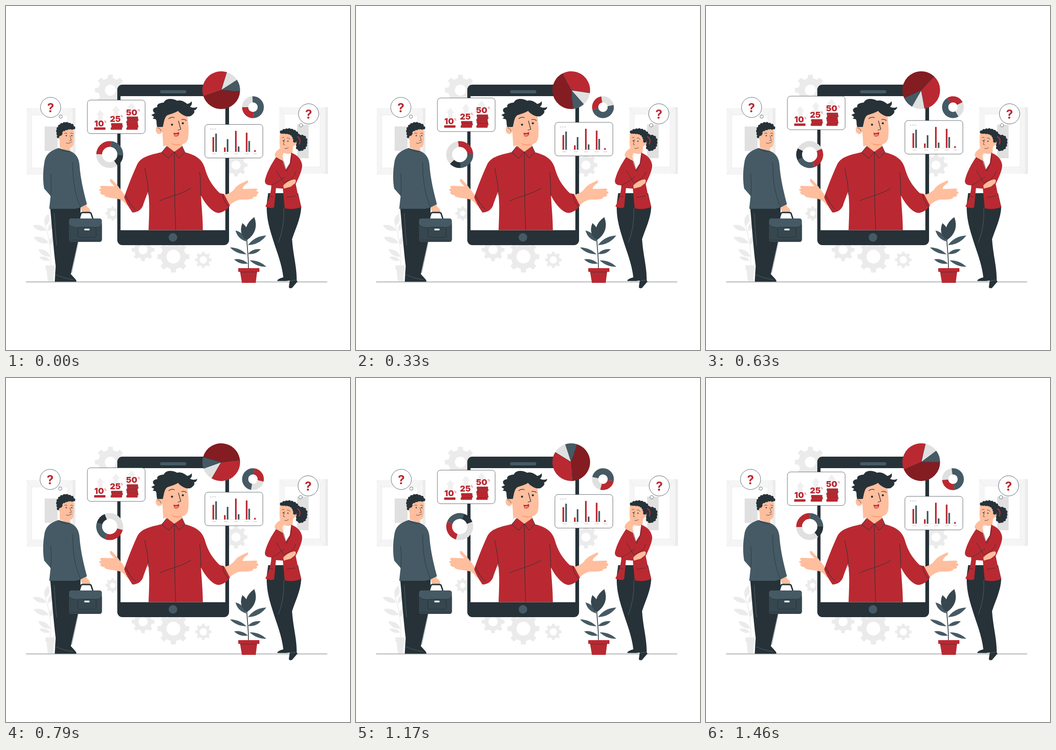
These frames come from a looping animation (748x748 px, 1.5 s). An HTML page:

```html
<!DOCTYPE html>
<html lang="en">
<head>
<meta charset="utf-8">
<style>
  html, body { margin: 0; width: 100%; height: 100%; overflow: hidden; background: #fff; }
  svg { display: block; width: 100vw; height: 100vh; }
  text { font-family: Inter, "Open Sans", sans-serif; fill: #ba2931; }
  .red { fill: #ba2931; } .dark { fill: #263238; } .slate { fill: #455a64; } .deep { fill: #37474f; }
  .pale { fill: #ebebeb; } .grey { fill: #e0e0e0; } .skin { fill: #ffbe9d; } .white { fill: #fff; }
  .line { fill: none; stroke: #263238; stroke-linecap: round; stroke-linejoin: round; }
  .seam { fill: none; stroke: #607580; stroke-width: .7; }
  .curls { stroke: #263238; stroke-width: 7; stroke-linecap: round; stroke-dasharray: 0 6; }
  .panel { fill: #fff; stroke: #263238; stroke-width: .7; }
  .big { font-weight: 900; font-size: 18px; }
  .small { font-size: 6px; }
  .ask { font-weight: 700; font-size: 27px; text-anchor: middle; }
</style>
</head>
<body>
<svg viewBox="0 0 748 748">
  <defs>
    <g id="frame">
      <path fill="#f5f5f5" d="M0 0H106V145H0Z"/>
      <path class="pale" d="M100 0H106V145H100Z"/>
      <path class="white" d="M11 15H89V130H11Z"/>
      <path fill="none" stroke="#e6e6e6" stroke-width=".7" d="M0 0L11 15H89V130H11V15M100 0L89 15M0 145L11 130M100 145L89 130"/>
    </g>
    <g id="bubble" class="panel"><circle r="22"/><circle cx="22" cy="20" r="3.6"/></g>
    <path id="arrow" fill="#f0f0f0" d="M0 0L9 11H5V24H-5V11H-9Z"/>
  </defs>

  <use href="#frame" x="45" y="222"/><path class="grey" d="M84 262H112V315H84Z"/>
  <use href="#frame" x="594" y="220"/><path class="grey" d="M633 258H658V331H633Z"/>
  <g id="gears" class="pale"></g>
  <g id="ghost" class="pale">
    <path d="M86 564H106V573H104L103 599H91L88 573H86Z"/>
    <path fill="none" stroke="#ebebeb" stroke-width="1.5" d="M97 565C100 535 92 495 85 475"/>
  </g>
  <path class="line" stroke-width=".7" d="M44 600H698"/>

  <!-- tablet -->
  <rect class="dark" x="242" y="171" width="243" height="349" rx="11"/>
  <path class="white" d="M249 196H477V487.500H249Z"/>
  <rect class="slate" x="335" y="183" width="57" height="7" rx="3.500"/>
  <circle class="slate" cx="363" cy="503" r="9.300"/>

  <!-- presenter -->
  <g>
    <path class="skin" d="M280 438L258 411C250 400 240 386 230 377C226 374 224 379 229 385L236 392L208 391C203 392 204 395 208 397C201 398 200 401 207 403C203 406 205 411 214 411C214 417 230 417 240 419C250 420 256 424 262 433Z"/>
    <path class="skin" d="M472 411C488 408 494 402 498 396C506 387 516 384 523 380C527 378 528 382 524 386C518 390 514 394 515 398L542 397C548 397 548 401 543 402C551 403 550 408 545 409C548 414 542 415 538 415C538 422 520 421 510 421C502 421 492 428 483 436Z"/>
    <path class="red" d="M350 305L338 318C312 324 293 328 285 345C275 367 265 392 257 416C262 430 270 442 275 449C287 449 297 441 299 430L309 403C313 430 311 460 310 487.500H428C428 460 425 435 424 412C434 432 450 450 463 450C474 448 482 441 487 434L474 409L465 407C450 393 440 377 434 358C429 338 420 326 389 318L383 305Z"/>
    <path class="skin" d="M338 240L342 306L348 303L366 317L384 304L383 301C392 299 396 292 396.500 283C398 268 396 252 394 236L378 222L350 224Z"/>
    <path fill="#ff9a6c" d="M358 298C367 301 376 302 384 300C377 304 366 305 358 298Z"/>
    <ellipse class="skin" cx="333" cy="269" rx="7.500" ry="9.500"/>
    <path class="dark" d="M341 263L329 263C326 256 329 249 325 246L319 245L322 241L316 237L324 233C317 229 318 221 329 220C327 213 334 211 343 210C347 200 362 200 372 206C380 203 390 209 394 213C399 212 402 210 403 207C406 212 403 217 400 219C406 222 412 222 416 219C415 225 411 227 408 227C412 229 409 235 400 240L393 240C386 238 379 234 374 228C369 232 358 235 352 237C345 240 344 250 341 263Z"/>
    <path class="line" stroke-width="1.300" d="M354 245Q360 240 366 243M382 247Q388 245 392 249M375 250L380 268L374 270"/>
    <path class="line" stroke-width=".8" d="M330 265Q335 265 337 272"/>
    <circle class="dark" cx="361" cy="258" r="2.300"/><circle class="dark" cx="384.500" cy="255" r="2.300"/>
    <path class="red" d="M364 275.500Q371 277.500 376 274C378 281 373 285.500 366 283Z"/>
    <path fill="#ff8a70" d="M365.500 280Q370 277 375 279Q373 284 366.500 282Z"/>
    <path class="line" stroke-width="1" d="M349 305L339 319L354 331L366 317L376 331L389 318L383 305M366 317L367 430L369 487M334 424C345 417 385 409 402 396M302 353C305 375 310 385 309 410M421 361C424 380 422 395 424 412M260 411Q268 430 281 442M472 409Q470 420 484 437"/>
  </g>

  <!-- man with briefcase -->
  <g>
    <path class="skin" d="M161 431L173 429L177 437C183 440 184 446 183 451L168 450Q163 445 161 431Z"/>
    <path class="dark" d="M96 438H162C162 465 160 485 157 510L141 583L151 594Q155 599 152 599.500H106L108 565C103 525 100 480 96 438Z"/>
    <path class="seam" d="M157 513L143 580M105 450Q107 490 110 520M108 584Q125 592 146 595"/>
    <path class="skin" d="M116 272L117 308L140 317L139 308C147 308 149 299 147.500 271L136 262L118 266Z"/>
    <path class="dark curls" d="M114 284L112 269L118 259L130 255L143 259L148 266L137 265L127 268L121 271L118 282Z"/>
    <ellipse class="skin" cx="119" cy="287" rx="4" ry="5"/>
    <path class="slate" d="M114 309C98 314 86 322 83.500 340C80 360 80 380 83 397L97 413L94 441H150L162 438L176 431C169 405 162 375 160 348C159 330 152 320 138 315Z"/>
    <path class="line" stroke-width=".8" d="M114 309Q126 319 139 316M145 340C145 380 150 410 162 437M97 413Q100 390 97 365M127 277Q130 275 133 277M140 277Q143 275 146 278M139 282L142 292L138 293M131 298Q138 300 143 295"/>
    <circle class="dark" cx="131" cy="282" r="1.300"/><circle class="dark" cx="143" cy="282" r="1.300"/>
    <path class="line" stroke-width="3" d="M159 463L163 451Q164 449 167 449H181Q184 449 185 451L189 463"/>
    <rect class="slate" x="137" y="462" width="71.500" height="51" rx="5"/>
    <path class="deep" d="M137 475Q140 481 156 482H192Q207 481 208.500 475V508Q208 513 203 513H142Q137 513 137 508Z"/>
    <path class="line" stroke-width=".9" d="M138 475Q140 481 156 482H192Q207 481 208 474M140 509H205"/>
    <rect class="deep" x="156" y="481" width="40" height="22" rx="4" stroke="#263238"/>
    <rect class="pale" x="170" y="484" width="12" height="4" rx="2"/>
  </g>

  <!-- woman -->
  <g>
    <path class="dark" d="M570 407H635L642 437C641 462 629 485 622 507C624 540 633 570 632 597L634 599L622 613Q616 615 615 611L617 597L609 598H590Q589 594 603 590C600 560 587 530 579 503C570 475 566 455 567 430Z"/>
    <path class="seam" d="M604 440Q606 480 592 515M617 598L630 596"/>
    <path class="white" d="M585 388H608V406H585Z"/>
    <path class="red" d="M587 329C576 345 567 362 563 379C562 387 568 390 577 390C576 410 570 424 564 436Q574 441 583 438L587 396L602 397L606 440Q625 444 642 437L634 407L630 387C638 370 644 357 644 346C642 333 634 324 620 319L604 335Z"/>
    <path class="white" d="M602 337L607 320H620L617 342L608 356Z"/>
    <path class="skin" d="M596 277C594 300 595 314 603 319C612 323 622 322 623 318L624 306L632 299V283L618 272L602 273Z"/>
    <path class="skin" d="M584 325C585 316 592 311 605 305Q609 307 600 313L605 315L601 326L604 338L587 329Z"/>
    <path class="skin" d="M603 390C611 382 621 377 628 377Q632 378 629 385L619 393L604 397Z"/>
    <path class="dark curls" d="M599 274L606 270L618 269L630 274L636 282L632 287L628 295L626 284L618 276L608 275Z"/>
    <path class="dark curls" d="M638 283L648 284L652 291L652 301L648 309L640 313L634 309L634 300L636 291Z"/>
    <path class="line" style="stroke:#ba2931" stroke-width="2.500" d="M634 284Q642 290 638 300"/>
    <path class="line" stroke-width=".8" d="M600 287Q602 284 605 286M611 287Q615 286 618 290M606 290L603 301L606 302M606 310Q610 311 614 308M621 319Q623 340 610 360M587 329L604 339L609 358M577 390C590 384 598 377 606 372M588 358L603 383M630 361Q627 376 604 384M611 416L629 413M571 414L581 415"/>
    <circle class="dark" cx="603" cy="293" r="1.300"/><circle class="dark" cx="613" cy="294" r="1.300"/>
  </g>

  <g id="plant">
    <path class="line" stroke-width="1.600" d="M527 571C528 545 523 520 523 490"/>
    <path class="red" d="M505 570H551V578H546L543 602H513L509 578H505Z"/>
    <path class="line" stroke-width=".7" d="M509 578.500H546"/>
  </g>

  <!-- moving parts -->
  <g class="float">
    <rect class="panel" x="177" y="204.500" width="125.500" height="73" rx="7"/>
    <use href="#arrow" x="205" y="226"/><use href="#arrow" x="239" y="217"/><use href="#arrow" x="273" y="210"/>
    <text class="big" x="192" y="261.500">10</text><text class="small" x="213" y="254">%</text>
    <text class="big" x="226" y="251.500">25</text><text class="small" x="249" y="242">%</text>
    <text class="big" x="261" y="237.500">50</text><text class="small" x="286" y="229">%</text>
    <g id="coins" class="red" stroke="#7d1c21" stroke-width=".6"></g>
  </g>
  <g class="float">
    <rect class="panel" x="432.500" y="257.500" width="126" height="73" rx="7"/>
    <g class="grey"><circle cx="445" cy="267.500" r="1.800"/><circle cx="450" cy="267.500" r="1.800"/><circle cx="455" cy="267.500" r="1.800"/></g>
    <path stroke="#e0e0e0" stroke-width=".7" d="M446 317.300H546"/>
    <path stroke="#d5d5d5" stroke-width="1.400" d="M449 321.500h9m16 0h9m13 0h9m14 0h9m10 0h8"/>
    <g id="bars"></g>
  </g>
  <g id="wheels"></g>
  <g class="shake">
    <use href="#bubble" x="97" y="220.500"/><text class="ask" x="97" y="230.500">?</text>
  </g>
  <g class="shake">
    <use href="#bubble" transform="translate(658 234.500) scale(-1 1) rotate(14)"/><text class="ask" x="658" y="245">?</text>
  </g>
</svg>
<script>
const RED = '#ba2931', MAROON = '#831d22', DARK = '#263238', SLATE = '#455a64', GREY = '#e0e0e0';
const $ = id => document.getElementById(id);
const add = (id, markup) => $(id).insertAdjacentHTML('beforeend', markup);

function gear(x, y, r, hole, teeth = 8) {
  const point = (radius, a) => `${x + radius * Math.cos(a)} ${y + radius * Math.sin(a)}`;
  const step = 2 * Math.PI / teeth, pts = [];
  for (let i = 0; i < teeth; i++) {
    const a = i * step;
    pts.push(point(r * .78, a - step * .28), point(r, a - step * .19), point(r, a + step * .19), point(r * .78, a + step * .28));
  }
  add('gears', `<path fill-rule="evenodd" d="M${pts.join('L')}ZM${x - hole} ${y}a${hole} ${hole} 0 1 0 ${2 * hole} 0a${hole} ${hole} 0 1 0 ${-2 * hole} 0Z"/>`);
}
gear(227, 183, 34, 12);
gear(500, 346, 25, 10);
gear(232, 451, 16, 6);
gear(298, 530, 25, 10);
gear(364, 545, 35, 15);
gear(429, 552, 18, 8);

function leaf(id, x1, y1, x2, y2, bulge, shade) {
  const mx = (x1 + x2) / 2, my = (y1 + y2) / 2, len = Math.hypot(x2 - x1, y2 - y1);
  const nx = (y1 - y2) / len * bulge, ny = (x2 - x1) / len * bulge;
  add(id, `<path class="${shade}" d="M${x1} ${y1}Q${mx + nx} ${my + ny} ${x2} ${y2}Q${mx - nx} ${my - ny} ${x1} ${y1}"/>`);
}
[[523, 512, 499, 488, 10], [526, 520, 566, 499, 11], [526, 539, 554, 529, 8],
 [530, 553, 566, 567, 8], [523, 540, 487, 525, 8], [526, 560, 496, 551, 8]]
  .forEach(l => leaf('plant', ...l, 'slate'));
[[524, 509, 540, 459, 20], [524, 510, 514, 472, 15]].forEach(l => leaf('plant', ...l, 'deep'));
[[86, 478, 92, 452, 11], [88, 488, 58, 477, 11], [92, 490, 103, 468, 9], [93, 515, 60, 503, 12],
 [95, 520, 104, 498, 9], [97, 545, 70, 529, 11], [96, 553, 72, 546, 8]]
  .forEach(l => leaf('ghost', ...l, 'pale'));

[[192, 1], [228, 3], [262, 6]].forEach(([x, count]) => {
  for (let i = 0; i < count; i++)
    add('coins', `<rect x="${x + i * 5 % 3 * .8}" y="${264.3 - i * 4.7}" width="24" height="4.5" rx="1"/>`);
});

[[449, 285], [455, 277.5], [474, 307.5], [480, 289.5], [498, 271.5], [504, 305.5], [521.5, 275.5], [527, 293.5], [539.5, 313.5]]
  .forEach(([x, y], i) => add('bars', `<path fill="${i % 2 ? SLATE : RED}" d="M${x} ${y}h3.6V317h-3.6Z"/>`));

// Slices are [colour, start, sweep] in degrees clockwise from the top.
const wheels = [];
function wheel(x, y, radius, hole, slices) {
  const r = (radius + hole) / 2;
  add('wheels', '<g>' + slices.map(([colour, start, sweep]) =>
    `<circle r="${r}" fill="none" stroke="${colour}" stroke-width="${radius - hole}" pathLength="360"
      stroke-dasharray="${sweep + .4} 360" transform="rotate(${start - 90})"/>`).join('') +
    (hole ? `<circle r="${hole}" fill="#fff"/>` : `<path fill="none" stroke="${DARK}" stroke-width=".5" d="${
      slices.map(([, a]) => `M0 0L${radius * Math.sin(a * Math.PI / 180)} ${-radius * Math.cos(a * Math.PI / 180)}`).join('')}"/>`) + '</g>');
  wheels.push({ el: $('wheels').lastElementChild, x, y });
}
wheel(468, 183, 41, 0, [[GREY, 17, 40], [SLATE, 57, 36], [MAROON, 93, 158], [RED, 251, 126]]);
wheel(537, 220, 23.7, 10.2, [[RED, 175, 95], [GREY, 270, 87], [SLATE, 357, 178]]);
wheel(225.5, 323, 29.3, 16.5, [[RED, 271, 95], [SLATE, 6, 88], [DARK, 94, 51], [GREY, 145, 126]]);

const floats = document.querySelectorAll('.float'), shakes = document.querySelectorAll('.shake');
const shakeX = [0, -1, 2, -4, 4, -4, 4, -4, 2, -1, 0];

function draw(now) {
  // The picture steps at 24 images per second; one cycle is slightly shorter than the loop.
  const phase = Math.floor((now % 1500 + 3.5) * .024) % 36 / 35.4;
  wheels.forEach(w => w.el.setAttribute('transform', `translate(${w.x} ${w.y}) rotate(${360 * phase})`));
  const rise = -10 * (1 - Math.abs(1 - 2 * phase));
  floats.forEach(el => el.setAttribute('transform', `translate(0 ${rise})`));
  const i = Math.min(9, Math.floor(phase * 10));
  const dx = shakeX[i] + (shakeX[i + 1] - shakeX[i]) * (phase * 10 - i);
  shakes.forEach(el => el.setAttribute('transform', `translate(${dx} 0)`));
  requestAnimationFrame(draw);
}
draw(performance.now());
</script>
</body>
</html>
```
